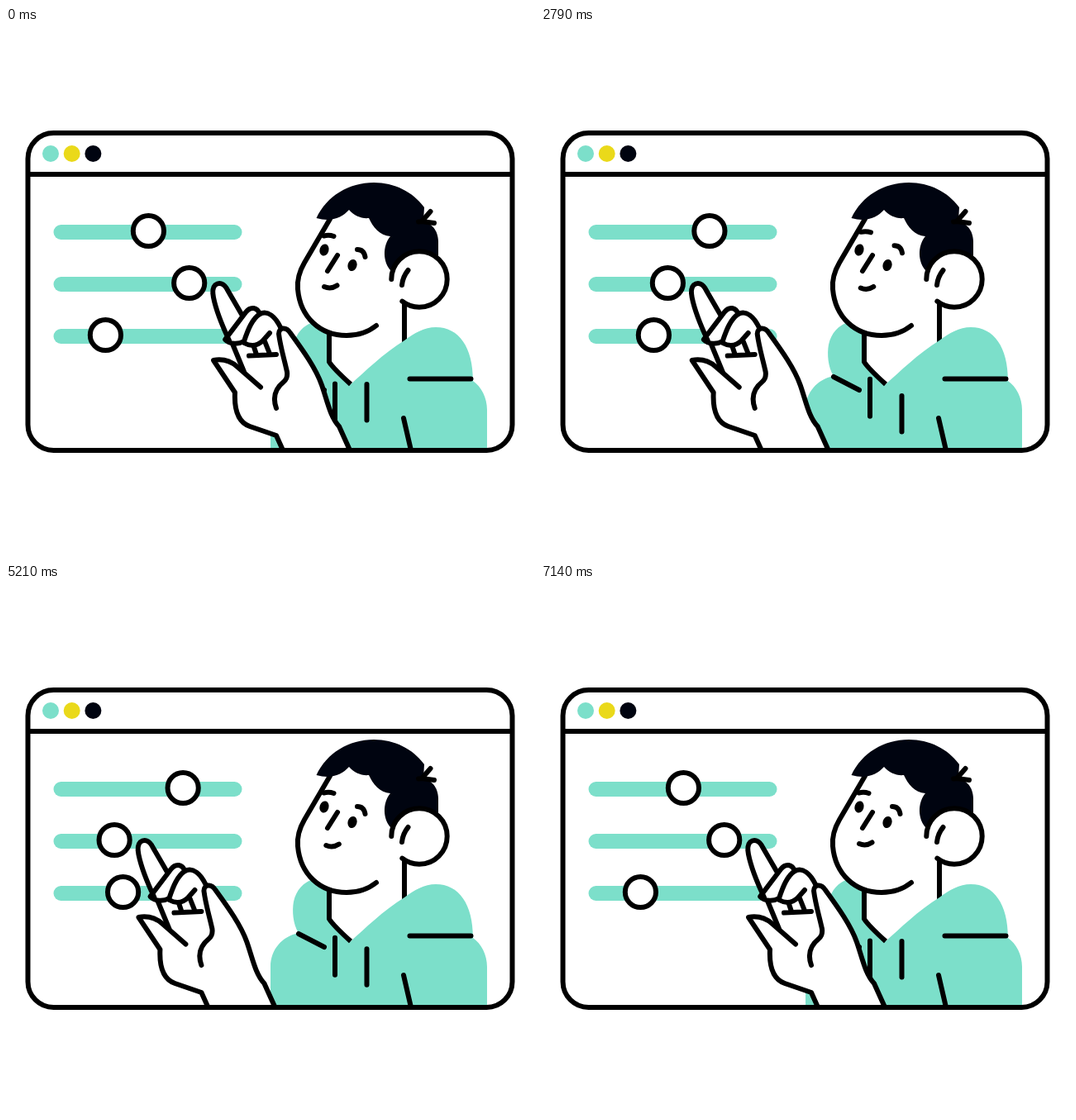
Animation, 640 px wide and 640 px high, one loop 7.21 s. Source, as an HTML page with a canvas:

```html
<!DOCTYPE html>
<html lang="en">
<head>
<meta charset="utf-8">
<title>Sliders</title>
<style>
html, body { margin: 0; width: 100%; height: 100%; overflow: hidden; background: #fff; }
canvas { display: block; width: 640px; height: 640px; }
</style>
</head>
<body>
<canvas id="stage" width="640" height="640"></canvas>
<script>
const ctx = document.getElementById('stage').getContext('2d');
const LOOP = 7210, FPS = 14;
const TEAL = '#7cdfca', YELLOW = '#ead91a', NIGHT = '#000410', INK = '#000', WHITE = '#fff';

const clamp = v => Math.min(1, Math.max(0, v));
const ease = (t, from, to) => { const p = clamp((t - from) / (to - from)); return p * p * (3 - 2 * p); };
const thereAndBack = (t, a, b, c, d) => ease(t, a, b) - ease(t, c, d);

function fill(d, color) {
  ctx.fillStyle = color;
  ctx.fill(new Path2D(d));
}

function line(d, cap = 'round') {
  ctx.lineCap = cap;
  ctx.stroke(new Path2D(d));
}

function disc(x, y, r, color, outlined) {
  ctx.beginPath();
  ctx.arc(x, y, r, 0, Math.PI * 2);
  ctx.fillStyle = color;
  ctx.fill();
  if (outlined) ctx.stroke();
}

function shifted(dx, dy, draw) {
  ctx.save();
  ctx.translate(dx, dy);
  draw();
  ctx.restore();
}

function windowShape() {
  ctx.beginPath();
  ctx.roundRect(26.5, 127, 586, 384, 31);
}

function drawSliders(slide) {
  const knobs = [172.4 + 0.461 * slide, 221.7 - slide, 120.4 + 0.234 * slide];
  knobs.forEach((x, i) => {
    const y = 247 + 63 * i;
    ctx.beginPath();
    ctx.roundRect(57.5, y - 9, 228, 18, 9);
    ctx.fillStyle = TEAL;
    ctx.fill();
    disc(x, y - 1.5, 18.6, WHITE, true);
  });
}

function drawBody(sway) {
  line('M482 331V386');
  fill('M320 511V462C320 441 334 425 354 421C347 410 346 394 348 383C351 369 360 360 371 356L391 370V404Q396 412 417 431' +
    'C434 416 456 394 482 378C494 369 506 362 520 362C548 362 565 386 565 427C575 434 582 447 582 462V511Z', TEAL);
  line('M391 368V404Q396 412 417 431', 'butt');
  line('M354 422L385 438M488.5 424.5H562.5M481 472L490 511');
  shifted(0, -6.5 * sway, () => line('M398 430.5V475.5'));
  shifted(0, 16 * sway, () => line('M436.5 431V474.5'));
}

function drawEye(x, y) {
  ctx.beginPath();
  ctx.ellipse(x, y, 5.5, 7.2, 0.28, 0, Math.PI * 2);
  ctx.fillStyle = INK;
  ctx.fill();
}

function drawHead(browLift, smile) {
  const jaw = 'M392 231L361 284C354 296 352 305 353 316C356 350 380 372 412 372C426 372 438 368 448 360';
  fill(jaw + 'L479 331V270L440 225Z', WHITE);
  line(jaw);
  fill('M375.5 230C388 203 415 187 445 187C470 187 492 198 506 217L505 234C519 238 524 249 523 264V290H467' +
    'L466 294C456 284 455 264 465 252C452 251 444 241 439 230C430 231 421 227 415 220C406 230 393 235 375.5 230Z', NIGHT);
  line('M499 234.5L503 234L513.5 222M503 234L518 236');

  ctx.beginPath();
  ctx.arc(500, 304, 33.7, Math.PI, 2.23 + Math.PI * 2);
  ctx.fillStyle = WHITE;
  ctx.fill();
  ctx.stroke();
  line('M479 311Q480 301 486.5 293');

  drawEye(385, 268.5);
  drawEye(419, 287);
  line('M401 275L389 294');
  shifted(2.5 * browLift, -4.7 * browLift, () =>
    line('M384.5 251.5Q391 250 396.5 252M425 268Q433 268 434.5 277'));
  shifted(3.2 * smile, 2.8 * smile, () => line('M385 313Q393 316.5 400.5 311.5'));
}

function drawHand() {
  fill('M335 515L327 493L295 482C281 477 276 461 277 441L251 402C262 399 272 403 289 417L275 382L265 377' +
    'C262 360 254 340 251 326C247 307 261 303 268 317L286 348C296 334 304 338 307 346C316 342 326 349 332 362' +
    'C337 362 341 364 344 369C360 391 375 412 382 432C389 452 392 470 403 482L418 515Z', WHITE);
  // index finger
  line('M286 348L268 317C264 309 258 307 253 311C249 315 250 321 251 326C254 341 262 361 270 378M274 382L288 416');
  // folded fingers
  line('M265 377L290 344C296 336 304 338 307 346C298 352 293 364 288 379C281 383 271 383 265 377Z');
  line('M307 346C317 341 326 350 332 362M288 381C297 386 305 384 311 378L319 369');
  line('M300 386L303 395M313 379L319 394M294 396.5L327 395');
  // palm and wrist
  line('M308 434.5L280 410C272 403 262 400 251 402L277 441C276 461 281 477 295 482L327 493L336 513');
  line('M327 460C322 446 326 436 336 428Q341 424 340 416C336 398 332 386 330 370' +
    'C330 362 339 361 344 369C360 391 375 412 382 432C389 452 392 470 403 482L417 513');
}

function draw(t) {
  const reach = thereAndBack(t, 1193, 4184, 4215, 7127);
  const slide = 124.5 * reach;
  const sway = thereAndBack(t, 0, 3600, 3600, 7200);
  const browLift = thereAndBack(t, 1800, 2500, 3700, 4400);

  ctx.fillStyle = WHITE;
  ctx.fillRect(0, 0, 640, 640);
  ctx.strokeStyle = INK;
  ctx.lineWidth = 6;
  ctx.lineJoin = 'round';

  ctx.save();
  windowShape();
  ctx.clip();
  drawSliders(slide);
  drawBody(sway);
  drawHead(browLift, reach);
  shifted(-slide, 0, drawHand);
  ctx.restore();

  windowShape();
  ctx.stroke();
  line('M26.5 177H612.5', 'butt');
  [TEAL, YELLOW, NIGHT].forEach((color, i) => disc(54 + 25.7 * i, 152, 10, color));
}

function tick() {
  const t = performance.now() % LOOP;
  draw(Math.floor((t + 5) * FPS / 1000) * 1000 / FPS);
  requestAnimationFrame(tick);
}
tick();
</script>
</body>
</html>
```
